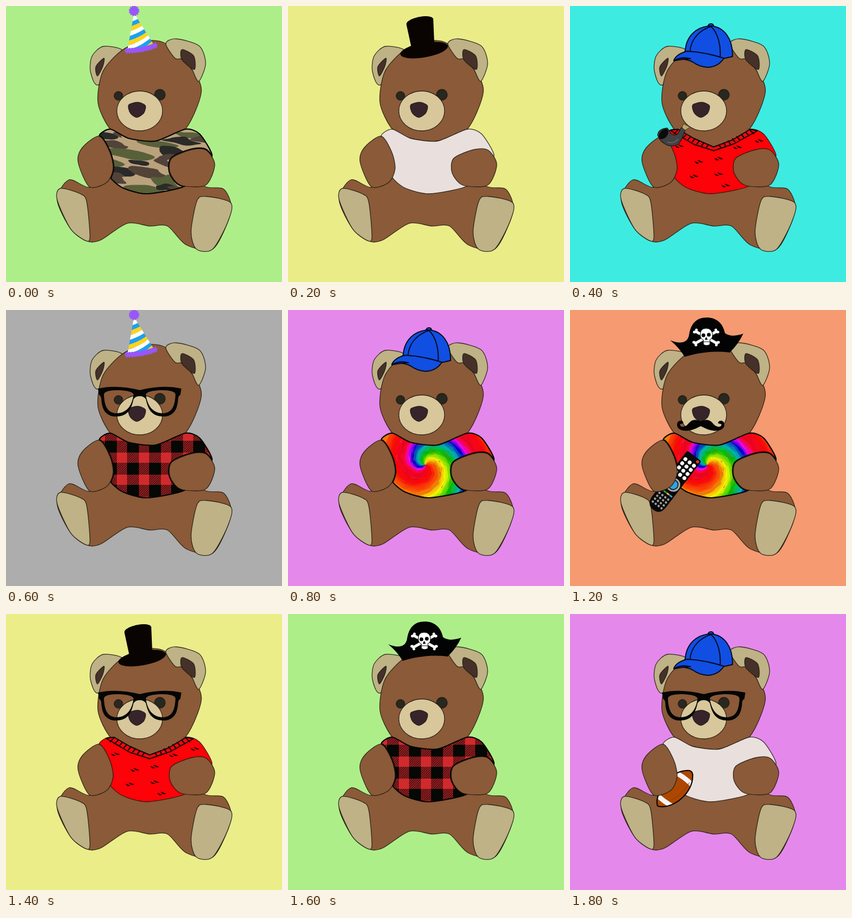
An HTML page for the animation above (2 s loop, 513 px wide and 513 px high).

```html
<!DOCTYPE html>
<html lang="en">
<head>
<meta charset="utf-8">
<title>Dress-up bear</title>
<style>
html, body { margin: 0; width: 100%; height: 100%; overflow: hidden; }
svg { display: block; width: 100vw; height: 100vh; }
.item { display: none; }
.item.on { display: inline; }
.line { stroke: #1d1710; stroke-opacity: .85; stroke-width: 1.3; stroke-linejoin: round; }
</style>
</head>
<body>
<svg viewBox="0 0 513 513">
  <defs>
    <path id="lens" d="M162 354C158 335 185 288 222 291Q229 293 228 302C228 331 195 361 168 358Q162 358 162 354Z"/>
    <clipPath id="shirtClip"></clipPath>
    <clipPath id="ballClip"><use href="#lens"/></clipPath>
    <clipPath id="coneClip"><path d="M238 13L226 80Q255 82 274 71Z"/></clipPath>
    <pattern id="hatch" width="3" height="3" patternUnits="userSpaceOnUse" patternTransform="rotate(45)">
      <path d="M0 0H3V3H0Z" fill="#350b0c"/><path d="M0 0H1.5V3H0Z" fill="#b32427"/>
    </pattern>
    <pattern id="check" x="206" y="265" width="41" height="41" patternUnits="userSpaceOnUse">
      <path d="M0 0H41V41H0Z" fill="#050804"/>
      <path d="M0 0H41V19H19V41H0Z" fill="url(#hatch)"/>
      <path d="M0 0H19V19H0Z" fill="#d12a2d"/>
    </pattern>
  </defs>
  <rect id="bg" width="513" height="513"/>
  <g id="bear"></g>

  <g class="item" id="white"></g>
  <g class="item" id="plaid"></g>
  <g class="item" id="camo"></g>
  <g class="item" id="dye"></g>
  <g class="item" id="red"></g>

  <g class="item" id="ball" fill="none">
    <g clip-path="url(#ballClip)">
      <path d="M155 285H235V365H155Z" fill="#ad4700"/>
      <path d="M194 294Q214 303 231 322M159 334Q174 349 193 359" stroke="#f7f3f3" stroke-width="9"/>
      <path d="M222 313Q211 334 188 346" stroke="#873700"/>
    </g>
    <use href="#lens" stroke="#0b0603" stroke-width="2.2"/>
  </g>
  <g class="item" id="remote">
    <g id="pad" transform="translate(195 319) rotate(37.5)">
      <path d="M-13 -60H12Q16 -60 16 -56V48Q16 66 0 66T-17 48V-56Q-17 -60 -13 -60Z" fill="#090909"/>
      <circle cx="1" cy="6.5" r="13" fill="#a9adb0"/>
      <circle cx="1" cy="6.5" r="10" fill="#222"/>
      <circle cx="1" cy="6.5" r="8" fill="#2ba7df"/>
    </g>
  </g>

  <g id="arms"></g>

  <g class="item" id="teeth" fill="#fff" stroke="#17120d" stroke-width="1.5" stroke-linejoin="round">
    <path d="M244 232Q250 231 256 232L258 241Q252 245 245 243Z"/>
    <path d="M259 231Q265 229 270 230L273 241Q267 244 260 243Z"/>
  </g>
  <g class="item" id="tache">
    <path id="half" d="M243 207C251 203 259 203 265 210C270 217 278 219 281 215C283 210 278 213 275 210C276 204 287 204 287 213C287 222 277 226 265 224C255 223 249 218 243 216Z" fill="#050403"/>
    <use href="#half" transform="translate(486) scale(-1 1)"/>
  </g>
  <g class="item" id="pipe">
    <path d="M163 240Q164 228 181 227L188 238Q195 242 200 238L207 226Q211 224 214 231Q207 252 200 258Q186 263 176 256Q166 250 163 240Z" fill="#414243" stroke="#181818" stroke-width="1.3"/>
    <ellipse cx="174" cy="238" rx="11" ry="7" transform="rotate(-48 174 238)" fill="#0b0b0b"/>
    <path d="M181 253Q194 257 201 247" fill="none" stroke="#686868" stroke-width="1.5"/>
    <path d="M211 219L223 225L214 231L208 226Z" fill="#b9a569" stroke="#3a321f"/>
  </g>
  <g class="item" id="glasses">
    <path id="rim" fill="#040604" fill-rule="evenodd" d="M171 146Q205 138 249 149V160Q240 160 237 166C233 185 226 198 203 198C186 197 178 186 177 164Q176 159 173 158Z
      M182 157Q183 149 208 149Q235 150 237 157C235 176 225 192 205 192C188 191 183 178 182 157Z"/>
    <use href="#rim" transform="translate(497) scale(-1 1)"/>
  </g>

  <g class="item" id="party" fill="none" stroke="#9856fb">
    <g id="cone" clip-path="url(#coneClip)" stroke-width="7.6"></g>
    <path d="M225 83Q255 83 277 73" stroke-width="8" stroke-linecap="round"/>
    <path d="M223 83Q255 83 279 73" stroke-width="10" stroke-dasharray="3 2"/>
    <circle cx="238" cy="9" r="8" fill="#9856fb" stroke-width="3.500" stroke-dasharray="3 1.200"/>
  </g>
  <g class="item" id="cap" fill="#104fe2" stroke="#050a1c" stroke-width="2" stroke-linejoin="round">
    <path d="M256 39Q257 33 262 33T267 39Z"/>
    <path d="M214 86C215 56 235 38 262 37C286 39 303 60 302 94L284 98Q250 90 214 86Z"/>
    <path d="M262 38C236 47 225 65 223 84M262 38C275 50 281 74 279 96" fill="none"/>
    <path d="M193 101Q198 89 218 84Q252 86 286 97Q276 113 256 114Q240 113 228 104Q212 96 193 101Z"/>
    <path d="M193 102Q206 93 224 98Q212 98 193 102Z" fill="#0a2f91"/>
  </g>
  <g class="item" id="pirate" stroke-linecap="round">
    <path d="M186 56C202 63 217 63 221 48C224 25 235 14 254 14C272 14 284 24 288 43C298 50 310 48 322 44Q314 62 297 79Q255 74 213 87Q204 71 186 56Z" fill="#030303"/>
    <g id="bone" stroke="#fff" stroke-width="5">
      <path d="M234 40L273 62M231 41h1M235 37h0M272 65h0M275 60h1"/>
    </g>
    <use href="#bone" transform="translate(506) scale(-1 1)"/>
    <path d="M242 46Q242 34 253 34T265 46Q265 53 260 55V64Q254 68 248 64V56Q242 53 242 46Z" fill="#fff" stroke="#030303"/>
    <path d="M248 47h0M258 46h0" stroke="#030303" stroke-width="7"/>
    <path d="M253 51l-2 4h4ZM249 59h10" stroke="#030303"/>
  </g>
  <g class="item" id="topper" fill="#090302">
    <ellipse cx="253" cy="82" rx="45" ry="13.500" transform="rotate(-10 253 82)"/>
    <path d="M220 34C220 22 266 13 270 24L272 72Q252 86 230 80Z"/>
  </g>
</svg>
<script>
const $ = id => document.getElementById(id);
const FUR = '#8b5a38', PAD = '#beb286', INNER = '#45312a', EYE = '#282720';

let seed = 7;
const rnd = () => (seed = seed * 16807 % 2147483647) / 2147483647;

const add = (box, tag, attrs) => {
  const el = document.createElementNS('http://www.w3.org/2000/svg', tag);
  for (const k in attrs) el.setAttribute(k, attrs[k]);
  return box.appendChild(el);
};
const points = text => text.split(' ').map(s => s.split(',').map(Number));

// Closed smooth outline through key points
const loop = (p, k = .14) => {
  const at = i => p[(i + p.length) % p.length];
  return 'M' + p[0] + p.map((b, i) => {
    const a = at(i - 1), c = at(i + 1), e = at(i + 2);
    return `C${b.map((v, j) => v + (c[j] - a[j]) * k)} ${c.map((v, j) => v - (e[j] - b[j]) * k)} ${c}`;
  }).join('') + 'Z';
};
const shape = (box, fill, text) => add(box, 'path', { d: loop(points(text)), fill, class: 'line' });
const oval = (box, fill, cx, cy, rx, ry) => add(box, 'ellipse', { cx, cy, rx, ry, fill, class: 'line' });

const bear = $('bear');
shape(bear, PAD, '216,82 181,75 160,93 157,122 171,147 210,110');
shape(bear, INNER, '182,97 167,113 170,130 180,112');
shape(bear, FUR, '216,82 258,65 297,70 345,117 363,160 333,229 278,251 228,246 194,229 171,180 180,122');
shape(bear, PAD, '297,70 316,61 359,74 371,107 358,140 345,117 327,99 314,97');
shape(bear, INNER, '327,81 349,93 350,118 327,100');
oval(bear, EYE, 209, 167, 8, 8);
oval(bear, EYE, 286, 165, 10, 10);
oval(bear, '#d8c79b', 248.5, 195, 42.5, 37);
shape(bear, '#37242a', '228,184 245,179 259,185 256,199 243,207 231,199');
shape(bear, FUR, '155,337 117,323 95,360 120,414 150,437 176,435 225,404 267,409 300,409 335,444 384,452 412,402 418,368 404,340 371,336 311,310 192,312');
shape(bear, PAD, '101,339 138,349 150,364 156,429 148,436 120,414 95,360');
shape(bear, PAD, '354,452 344,420 355,362 372,354 418,366 412,402 384,452');

const limbs = [
  '173,242 142,263 134,290 155,336 187,328 199,303 193,272',
  '345,267 372,268 388,295 371,333 325,333 305,310 308,283'
];
limbs.forEach(text => shape($('arms'), FUR, text));

const shirt = loop(points('173,242 194,229 228,246 278,251 333,229 360,238 383,278 360,300 332,335 262,349 217,338 192,316 185,280'), .12);
add($('shirtClip'), 'path', { d: shirt });
const cloth = (id, fill) => {
  add($(id), 'path', { d: shirt, fill, class: 'line' });
  return add($(id), 'g', { 'clip-path': 'url(#shirtClip)' });
};
// Heavy hem, also where the arms meet the cloth
const trim = (id, inside) => {
  const ink = { fill: 'none', stroke: '#080604' };
  limbs.forEach(text => add(inside, 'path', { d: loop(points(text)), ...ink, 'stroke-width': 4.5 }));
  add($(id), 'path', { d: shirt, ...ink, 'stroke-width': 2.2 });
};

cloth('white', '#e9e0de');
trim('plaid', cloth('plaid', 'url(#check)'));

// Camouflage: staggered rows of flat, wobbly patches
const camo = cloth('camo', '#baa27d');
for (let i = 0; i < 36; i++) {
  const cx = 180 + i % 5 * 48 + rnd() * 34, cy = 234 + Math.floor(i / 5) * 17 + rnd() * 8;
  const w = 20 + rnd() * 20, h = 6 + rnd() * 5;
  const ring = Array.from({ length: 9 }, (_, j) => {
    const a = j / 9 * 2 * Math.PI, r = .6 + rnd() * .7, x = w * r * Math.cos(a);
    return [cx + x, cy + h * r * Math.sin(a) + x * .12];
  });
  add(camo, 'path', { d: loop(ring, .17), fill: ['#2a2a29', '#524339', '#baa27d', '#58603a'][i % 4] });
}
trim('camo', camo);

// Tie-dye: spiral bands of one hue each, with ragged edges
const dye = cloth('dye', '#e33');
const band = turn => Array.from({ length: 37 }, (_, i) => {
  const r = i * 4, a = (80 - turn + 3 * (r - 40) + (rnd() - .5) * 16) * Math.PI / 180;
  return [(255 + r * Math.cos(a)).toFixed(1), (288 + r * Math.sin(a)).toFixed(1)];
});
for (let turn = 0; turn < 360; turn += 6) {
  const hue = 360 * ((turn + 120) % 360 / 360) ** 2.3 - 8;
  const light = 48 - 14 * Math.max(0, Math.sin((hue - 60) / 110 * Math.PI / 2));
  add(dye, 'path', {
    d: 'M' + band(turn).join('L') + 'L' + band(turn + 14).reverse().join('L') + 'Z',
    fill: `hsl(${hue} 96% ${light + (rnd() - .5) * 6}%)`
  });
}
trim('dye', dye);

// Red sweater with ribbed collar and knit ticks
const red = $('red');
cloth('red', '#fd0208');
add(red, 'path', { d: 'M198 227Q230 247 267 263Q302 249 337 228L278 240Z', fill: FUR });
add(red, 'path', {
  d: 'M186 231L201 229L230 246L267 262L302 249L335 229L348 232L305 256L267 269L230 257Z',
  fill: '#f3080c', stroke: '#100303', 'stroke-width': 2, 'stroke-linejoin': 'round'
});
let ribs = '';
for (let u = 0; u < 1; u += 1 / 8) {
  const y = 230 + 32 * u, drop = 8 - 2 * u;
  ribs += `M${201 + 64 * u} ${y}l${4 * u - 8} ${drop}M${334 - 65 * u} ${y}l${8 - 5 * u} ${drop}`;
}
add(red, 'path', { d: ribs, stroke: '#100303', 'stroke-width': 2.2 });
for (const [x, y] of points('203,261 239,290 276,284 230,317 276,313 289,334 311,263 351,251'))
  add(red, 'path', { d: `M${x - 7} ${y - 1}l7 3h-4ZM${x - 1} ${y - 3}l4 3h5Z`, fill: '#210203', stroke: '#210203', 'stroke-width': 1.3 });

// Remote buttons
const dot = (cx, cy, r, fill) => add($('pad'), 'circle', { cx, cy, r, fill });
const KEYS = ['#e3322b', '#21a150', '#f2b52c', '#2ba7df'];
dot(11, -55, 3, KEYS[0]);
for (let i = 0; i < 4; i++) {
  const y = i * 9.7 - 45, x = i * 6.8 - 13;
  for (let c = -1; c < 2; c++) dot(c * 10, y, 3.6, '#fff');
  add($('pad'), 'path', { d: `M${x} 26h6`, stroke: KEYS[i], 'stroke-width': 3 });
  for (let c = 0; c < 4; c++) dot(x + 3, 34 + c * 6.8, 2.2, '#9b9b9b');
}

// Party hat stripes
for (let i = 0; i < 12; i++) {
  const y = 95 - i * 8.5;
  add($('cone'), 'path', { d: `M215 ${y + 2}Q252 ${y - 3} 282 ${y - 36}`, stroke: ['#ffd31c', '#1ba1ef', '#fff'][i % 3] });
}

const looks = [
  ['#aeee89', 'camo party'],
  ['#eaec88', 'white topper'],
  ['#3eebe1', 'red cap pipe'],
  ['#adadad', 'plaid party glasses'],
  ['#e588eb', 'dye cap'],
  ['#3e80ff', 'red teeth ball'],
  ['#f69a72', 'dye pirate tache remote'],
  ['#ebed89', 'red topper glasses'],
  ['#aeee89', 'plaid pirate'],
  ['#e588eb', 'white cap glasses ball']
];
const STEP = 200, items = [...document.querySelectorAll('.item')];
const start = performance.now();
let shown = -1;
const draw = now => {
  const i = Math.floor(Math.max(0, now - start) / STEP) % looks.length;
  if (i !== shown) {
    shown = i;
    const [color, wear] = looks[i], worn = wear.split(' ');
    $('bg').setAttribute('fill', color);
    items.forEach(el => el.classList.toggle('on', worn.includes(el.id)));
  }
  requestAnimationFrame(draw);
};
draw(start);
</script>
</body>
</html>
```
